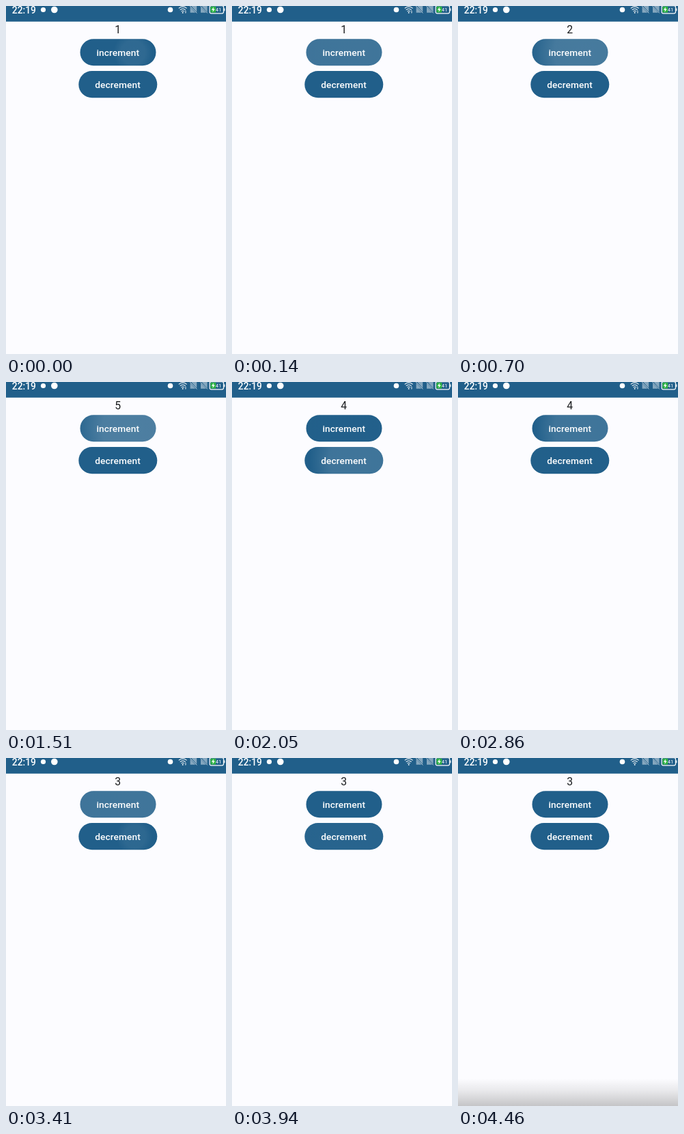
These frames come from a looping animation (322 px wide and 509 px high, 6.02 s). An HTML page:

```html
<!DOCTYPE html>
<html lang="en">
<head>
<meta charset="utf-8">
<title>Counter</title>
<style>
  html, body { margin: 0; width: 100%; height: 100%; overflow: hidden; background: #fcfcff; }
  svg { display: block; width: 100vw; height: 100vh; }
  text { font-family: Roboto, "Noto Sans", sans-serif; }
  .label { font-size: 13.7px; font-weight: 500; letter-spacing: .1px; fill: #fff; text-anchor: middle; }
  .brand { fill: #215f8a; }
</style>
</head>
<body>
<svg viewBox="0 0 322 509">
  <defs>
    <radialGradient id="glow">
      <stop offset="0" stop-color="#fff"/>
      <stop offset=".6" stop-color="#fff" stop-opacity=".95"/>
      <stop offset="1" stop-color="#fff" stop-opacity="0"/>
    </radialGradient>
    <linearGradient id="fade" x2="0" y2="1">
      <stop offset="0" stop-color="#000" stop-opacity="0"/>
      <stop offset=".45" stop-color="#000" stop-opacity=".08"/>
      <stop offset="1" stop-color="#000" stop-opacity=".22"/>
    </linearGradient>
    <clipPath id="incClip"><rect x="108.5" y="48.2" width="111" height="39" rx="19.5"/></clipPath>
    <clipPath id="decClip"><rect x="106.3" y="95.1" width="115" height="39.1" rx="19.5"/></clipPath>
  </defs>

  <rect width="322" height="509" fill="#fcfcff"/>
  <rect class="brand" width="322" height="22.8"/>

  <!-- status bar -->
  <text x="8.8" y="10.6" font-size="13.8" font-weight="500" fill="#fff">22:19</text>
  <g fill="#fff">
    <circle cx="54.5" cy="5.5" r="3.6"/>
    <circle cx="70.8" cy="5.5" r="4.8"/>
    <circle cx="240.5" cy="5.5" r="3.8"/>
  </g>
  <g fill="none" stroke="#fff" stroke-width="1.1">
    <path d="M252.8 3.4Q258.7 -1.6 264.6 3.4"/>
    <path d="M254.7 5.7Q258.7 2.4 262.7 5.7"/>
    <path d="M256.6 7.9Q258.7 6.2 260.8 7.9"/>
  </g>
  <circle cx="258.7" cy="9.7" r="1" fill="#fff"/>
  <path id="traffic" d="M261.8 8.2l1.1 -1.6 1.1 1.6zM261.8 9.2h2.2l-1.1 1.6z" fill="#fff"/>
  <g id="sim">
    <path d="M269.6 1.6V9.8H277.4ZM271 0H279.2V9Z" fill="#fff" fill-opacity=".45"/>
    <path d="M269.2 .2L279.4 10.4" stroke="#fff" stroke-opacity=".7"/>
  </g>
  <use href="#sim" x="15.4"/>
  <rect x="298.1" y="-.4" width="20.4" height="11.2" rx="2.2" fill="#215f8a" stroke="#fff" stroke-width="1.2"/>
  <rect x="299.4" y=".8" width="7.8" height="8.8" rx="1" fill="#2fb344"/>
  <path d="M304 1.4L300.8 5.8H303L302.4 9L305.8 4.6H303.6Z" fill="#fff"/>
  <text x="311" y="8.2" font-size="7.6" fill="#fff" text-anchor="middle">41</text>
  <rect x="319.2" y="3.2" width="1.2" height="4.2" rx=".6" fill="#fff"/>

  <text id="count" x="163.6" y="39.7" font-size="15.8" fill="#1a1c1e" text-anchor="middle">1</text>

  <g id="inc" clip-path="url(#incClip)">
    <rect class="brand" x="108" y="47" width="112" height="41"/>
  </g>
  <text class="label" x="163.8" y="73.2">increment</text>

  <g id="dec" clip-path="url(#decClip)">
    <rect class="brand" x="106" y="94" width="116" height="41"/>
  </g>
  <text class="label" x="163.6" y="120">decrement</text>

  <rect id="shade" y="469" width="322" height="40" fill="url(#fade)"/>
</svg>
<script>
const LOOP = 6020;
const GROW = 225, FADE_IN = 75, FADE_OUT = 500, ALPHA = .14;
const el = id => document.getElementById(id);
const clamp = x => Math.min(1, Math.max(0, x));
const smooth = x => x * x * (3 - 2 * x);

// A press counts at `at`; its ripple grows from `down` and fades after `up`.
const press = (step, at, down = at - 100, up = at + 130) => ({ step, at, down, up });
const presses = [
  press(1, 0, -35, 460),
  ...[700, 940, 1240, 1510].map(at => press(1, at)),
  ...[2050, 2320].map(at => press(-1, at)),
  press(1, 2860, 2760, 3450),
  press(-1, 3260, 3380, 3680)
];

for (const p of presses) {
  const up = p.step > 0;
  p.circle = document.createElementNS("http://www.w3.org/2000/svg", "circle");
  p.circle.setAttribute("cx", up ? 186 : 188);
  p.circle.setAttribute("cy", up ? 68 : 115);
  p.circle.setAttribute("fill", "url(#glow)");
  el(up ? "inc" : "dec").append(p.circle);
}

function drawRipple(p, t) {
  const age = t - p.down;
  const fadeOut = 1 - clamp((t - p.up) / FADE_OUT);
  const alpha = t < p.at ? 0 : ALPHA * clamp(age / FADE_IN) * fadeOut ** 2;
  p.circle.setAttribute("r", 20 + 130 * smooth(clamp(age / GROW)));
  p.circle.setAttribute("opacity", alpha);
}

function draw(t) {
  el("count").textContent = presses.reduce((n, p) => n + (p.at <= t ? p.step : 0), 0);
  presses.forEach(p => drawRipple(p, t));
  el("traffic").setAttribute("opacity", t < 3790 ? 1 : 0);
  el("shade").setAttribute("opacity", t < 4310 ? 0 : 1);
}

const start = performance.now();
function tick() {
  draw((performance.now() - start) % LOOP);
  requestAnimationFrame(tick);
}
tick();
</script>
</body>
</html>
```
